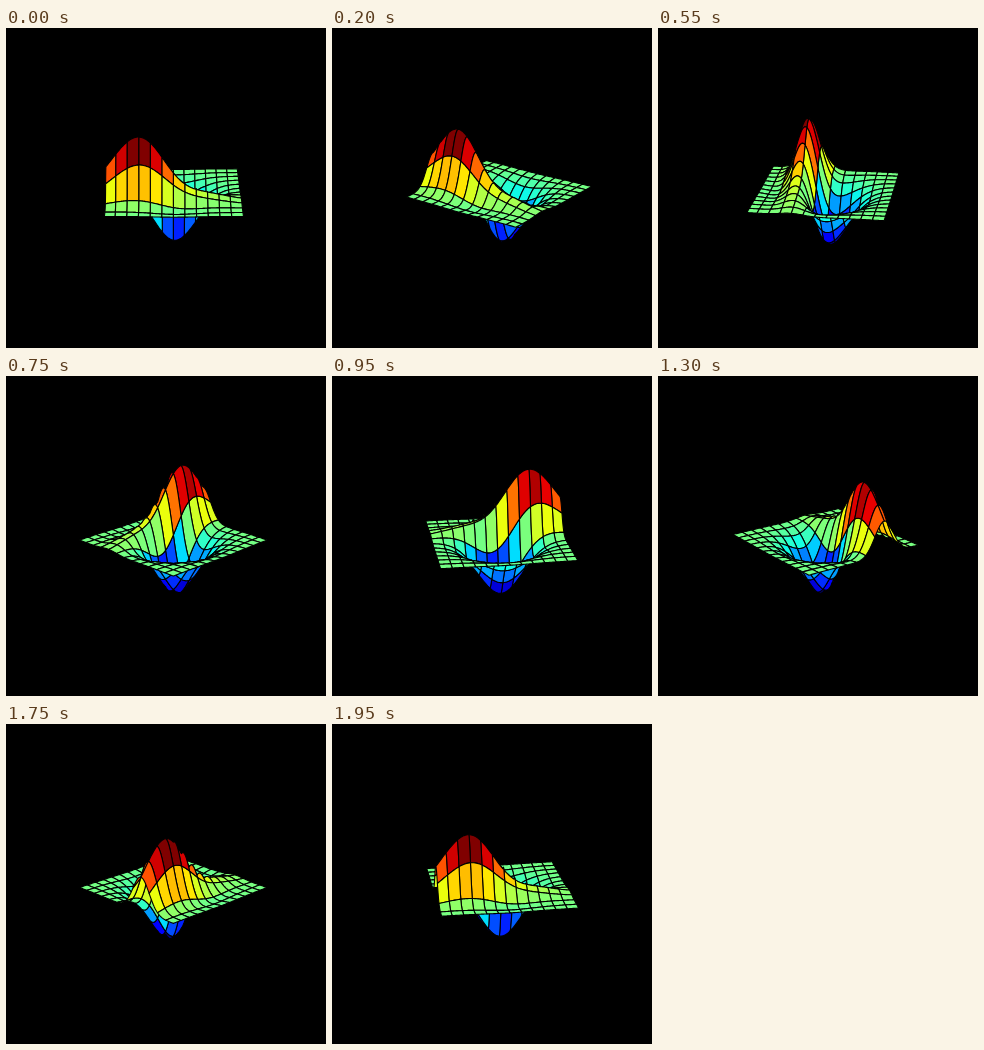
These frames come from a looping animation (320x320 px, 2000 ms). An HTML page with a canvas:

```html
<!DOCTYPE html>
<html lang="en">
<head>
<meta charset="utf-8">
<title>Rotating surface</title>
<style>
  html, body { margin: 0; width: 100%; height: 100%; overflow: hidden; background: #000; }
  canvas { display: block; width: 320px; height: 320px; }
</style>
</head>
<body>
<canvas id="stage" width="320" height="320"></canvas>
<script>
const ctx = document.getElementById('stage').getContext('2d');

const SAMPLES = 120, STRIDE = 10;
const STEPS = 40, STEP_MS = 50;
const ELEVATION = 20 * Math.PI / 180;
const CAMERA = 10;
const CENTER = { x: 167.35, y: 156.54 };
const SCALE = { x: 134.05, y: 138.4 };

const JET = [
  [[0, 0], [.35, 0], [.66, 1], [.89, 1], [1, .5]],
  [[0, 0], [.125, 0], [.375, 1], [.64, 1], [.91, 0], [1, 0]],
  [[0, .5], [.11, 1], [.34, 1], [.65, 0], [1, 0]]
];

function ramp(stops, t) {
  const i = Math.max(1, stops.findIndex(s => s[0] >= t));
  const [t0, v0] = stops[i - 1], [t1, v1] = stops[i];
  return v0 + (v1 - v0) * (t - t0) / (t1 - t0);
}

function jet(t) {
  const level = Math.min(255, Math.floor(t * 256)) / 255;
  return `rgb(${JET.map(stops => Math.round(255 * ramp(stops, level)))})`;
}

// A wide, flattened bell minus a round one
function height(x, y) {
  const bell = (u, v, su, sv) =>
    Math.exp(-((u / su) ** 2 + (v / sv) ** 2) / 2) / (2 * Math.PI * su * sv);
  return 500 * (bell(x - 1, y - 1, 1.5, .5) - bell(x, y, 1, 1));
}

// Point in a unit box whose vertical axis runs from -80 to 100
function sample(col, row) {
  const x = -3 + col * .05, y = -3 + row * .05, h = height(x, y);
  return { x: x / 6, y: y / 6, z: (h - 10) / 180, h };
}

function makeFace(c0, r0) {
  const c1 = Math.min(c0 + STRIDE, SAMPLES - 1);
  const r1 = Math.min(r0 + STRIDE, SAMPLES - 1);
  const points = [];
  for (let c = c0; c < c1; c++) points.push(sample(c, r0));
  for (let r = r0; r < r1; r++) points.push(sample(c1, r));
  for (let c = c1; c > c0; c--) points.push(sample(c, r1));
  for (let r = r1; r >= r0; r--) points.push(sample(c0, r));
  const mean = points.reduce((sum, p) => sum + p.h, 0) / points.length;
  return { points, mean };
}

const faces = [];
for (let r = 0; r < SAMPLES - 1; r += STRIDE)
  for (let c = 0; c < SAMPLES - 1; c += STRIDE) faces.push(makeFace(c, r));

const means = faces.map(f => f.mean);
const low = Math.min(...means), high = Math.max(...means);
for (const f of faces) f.color = jet((f.mean - low) / (high - low));

function projector(angle) {
  const ca = Math.cos(angle), sa = Math.sin(angle);
  const ce = Math.cos(ELEVATION), se = Math.sin(ELEVATION);
  return p => {
    const right = -p.x * ca - p.y * sa;
    const near = p.y * ca - p.x * sa;
    const k = CAMERA / (CAMERA - near * ce - p.z * se);
    return {
      x: CENTER.x + SCALE.x * k * right,
      y: CENTER.y - SCALE.y * k * (p.z * ce - near * se),
      k
    };
  };
}

function draw(angle) {
  const project = projector(angle);
  const shapes = faces.map(f => {
    const points = f.points.map(project);
    const depth = points.reduce((sum, p) => sum + p.k, 0) / points.length;
    return { points, depth, color: f.color };
  }).sort((a, b) => a.depth - b.depth);

  ctx.fillStyle = '#000';
  ctx.fillRect(0, 0, 320, 320);
  ctx.strokeStyle = '#000';
  ctx.lineWidth = 1.11;
  ctx.lineJoin = 'round';
  for (const s of shapes) {
    ctx.beginPath();
    for (const p of s.points) ctx.lineTo(p.x, p.y);
    ctx.closePath();
    ctx.fillStyle = s.color;
    ctx.fill();
    ctx.stroke();
  }
}

let shown = -1;
function tick() {
  const step = Math.floor(performance.now() / STEP_MS) % STEPS;
  if (step !== shown) {
    shown = step;
    draw(step / STEPS * 2 * Math.PI);
  }
  requestAnimationFrame(tick);
}
tick();
</script>
</body>
</html>
```
